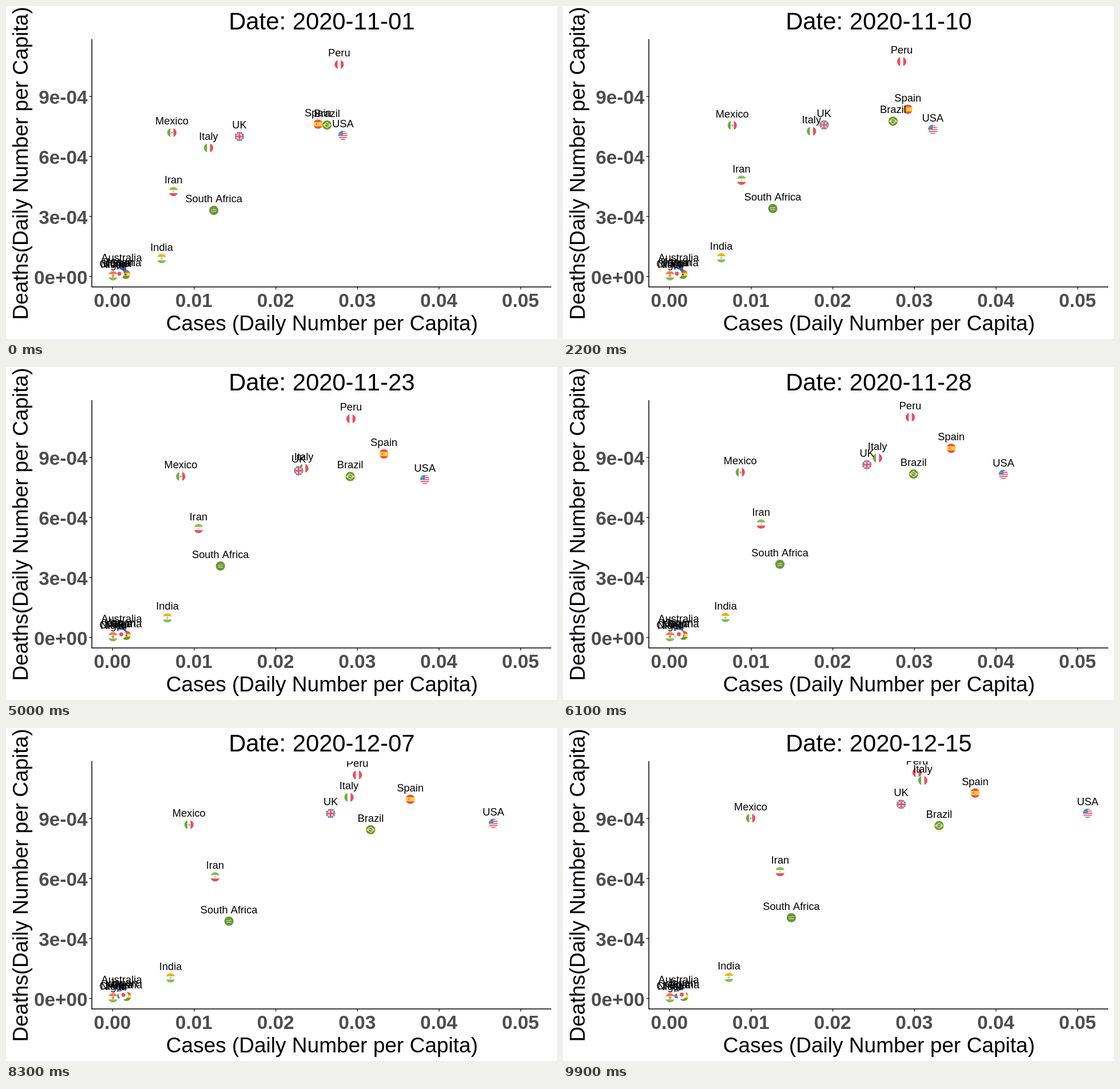
An HTML page for the animation above (10 s loop, 963 by 582 pixels).

```html
<!DOCTYPE html>
<html lang="en">
<head>
<meta charset="utf-8">
<title>Cases and deaths per capita</title>
<style>
html, body { margin: 0; width: 100%; height: 100%; overflow: hidden; background: #fff; }
svg { display: block; font-family: "Liberation Sans", Arial, sans-serif; font-kerning: none; }
text { text-anchor: middle; }
.tick { font-weight: bold; font-size: 33.3px; fill: #4d4d4d; }
.ytick { text-anchor: end; }
.axis { font-size: 37px; }
.title { font-size: 41.8px; }
.label { font-size: 18.3px; }
</style>
</head>
<body>
<svg id="stage" width="963" height="582" viewBox="0 0 963 582">
  <defs>
    <clipPath id="panel"><rect x="150" y="58" width="803" height="433"/></clipPath>
    <clipPath id="disc"><circle r="8.1"/></clipPath>
  </defs>
  <g clip-path="url(#panel)"><g id="flags"></g><g id="labels"></g></g>
  <g id="axes"></g>
  <path d="M150 58V491H953" fill="none" stroke="#000" stroke-width="1.5"/>
  <text class="axis" x="552.3" y="567">Cases (Daily Number per Capita)</text>
  <text class="axis" transform="translate(38 275) rotate(-90)">Deaths(Daily Number per Capita)</text>
  <text class="title" id="date" x="551.8" y="41"></text>
</svg>
<script>
const FRAME_MS = 100, FRAMES = 100, DAYS = 44;
const RED = '#ed4c5c', GREEN = '#699635', LIME = '#83bf4f', LEAF = '#75a843',
      BLUE = '#428bc1', NAVY = '#2a5f9e', GOLD = '#ffce31', YELLOW = '#ffe62e',
      AMBER = '#f2b200', ORANGE = '#f47c4c', WHITE = '#fff';

const byId = id => document.getElementById(id);
const rect = (x, y, w, h, fill) => `<rect x="${x}" y="${y}" width="${w}" height="${h}" fill="${fill}"/>`;
const dot = (x, y, r, fill) => `<circle cx="${x}" cy="${y}" r="${r}" fill="${fill}"/>`;
const shape = (d, fill) => `<path d="${d}" fill="${fill}"/>`;
const line = (d, color, width) => `<path d="${d}" stroke="${color}" stroke-width="${width}" fill="none"/>`;

// Flags are drawn around 0,0 and cut to a disc
const field = color => rect(-9, -9, 18, 18, color);
const across = (a, b, c, half = 2.8) => field(b) + rect(-9, -9, 18, 9 - half, a) + rect(-9, half, 18, 9 - half, c);
const upright = (a, b, c, half = 2.7) => field(b) + rect(-9, -9, 9 - half, 18, a) + rect(half, -9, 9 - half, 18, c);

function unionJack() {
  const diagonals = 'M-8-8L8 8M8-8L-8 8', cross = 'M0-9V9M-9 0H9';
  return field(NAVY) + line(diagonals, WHITE, 2.2) + line(diagonals, RED, .8)
    + line(cross, WHITE, 4.2) + line(cross, RED, 2.7);
}

function starsAndStripes() {
  let stripes = field(WHITE);
  for (let y = -8; y < 8; y += 3.5) stripes += rect(-9, y, 18, 1.75, RED);
  return stripes + rect(-9, -9, 9, 9, BLUE) + dot(-5, -3, .5, WHITE) + dot(-2.5, -3, .5, WHITE);
}

const southernCross = () => field(NAVY) + line('M-8-4H0M-4-8V0', WHITE, 1.8) + line('M-8-4H0M-4-8V0', RED, .9)
  + dot(4, -4, .8, WHITE) + dot(4, 4, .8, WHITE) + dot(-3, 4, 1.1, WHITE);

// A country glides from one point to another, drawn towards a third on the way
const midpoint = (a, b) => a.map((v, i) => (v + b[i]) / 2);
const country = (name, flag, from, to = from, via = midpoint(from, to)) => ({ name, flag, from, via, to });

const countries = [
  country('Ghana', across(RED, YELLOW, GREEN, 2.5) + shape('M0-2.8L1.7 2.4L-2.7-.8H2.7L-1.7 2.4Z', '#3e4347'), [209, 469], [211, 469]),
  country('China', field(RED) + dot(-3, -2, 1.8, YELLOW), [187, 471.4]),
  country('Australia', southernCross(), [202, 460]),
  country('Korea', field(WHITE) + dot(0, 0, 4, BLUE) + shape('M-4 0A4 4 0 0 1 4 0A2 2 0 0 1 0 0A2 2 0 0 0-4 0Z', RED), [194, 469.5], [198.5, 468.5]),
  country('Japan', field(WHITE) + dot(0, 0, 3.4, RED), [198, 468], [207.5, 466], [200, 467.5]),
  country('Niger', across(ORANGE, WHITE, LIME) + dot(0, 0, 2.2, ORANGE), [187, 471.5]),
  country('India', across(AMBER, WHITE, LIME) + dot(0, 0, 1.9, '#a8c9e0'), [272, 441.5], [290, 436], [283, 438.3]),
  country('South Africa', field(GREEN) + line('M-4.5-1.6L-2.5-.6L-1-2L.6-.8L2.5-2L4.5-1M-4 2H4', WHITE, .9), [363.2, 357.2], [399, 331.5], [368, 351.5]),
  country('Iran', across(LIME, WHITE, RED) + dot(0, 0, 1.2, '#f29aa3'), [292.7, 324.3], [379.5, 251], [336, 277.7]),
  country('Mexico', upright(LEAF, WHITE, RED) + dot(.2, 0, 1.5, '#96a07a'), [290, 221.3], [328, 157.7], [301.4, 193.5]),
  country('Peru', upright(RED, WHITE, RED), [582.3, 102.3], [618.8, 78], [605, 91]),
  country('Italy', upright(LEAF, WHITE, RED), [354, 248], [628.8, 91.7], [547, 186]),
  country('UK', unionJack(), [408, 228], [591, 133.3], [521.5, 183]),
  country('Spain', across(RED, GOLD, RED, 3.7) + rect(-4.4, -1.6, 3, 3.4, '#ee8a4c'), [545.3, 206.5], [720.3, 113.7], [686.4, 144.7]),
  country('Brazil', field(GREEN) + shape('M-7.6 0L0-5.6L7.6 0L0 5.6Z', YELLOW) + dot(0, 0, 3.2, BLUE) + line('M-3-.8Q0-1 2.8 1.3', WHITE, .9), [561, 208], [657.3, 170.5], [593, 194]),
  country('USA', starsAndStripes(), [588.8, 226.3], [917, 149], [708, 206.7])
];

function drawAxes() {
  let marks = '';
  for (let i = 0; i < 6; i++) {
    const x = 186.3 + i * 142.65;
    marks += line(`M${x} 491v4.5`, '#333', 1.5) + `<text class="tick" x="${x - .5}" y="525.5">0.0${i}</text>`;
  }
  for (let i = 0; i < 4; i++) {
    const y = 472.6 - i * 104.8, value = i ? `${i * 3}e-04` : '0e+00';
    marks += line(`M150 ${y}h-4.5`, '#333', 1.5) + `<text class="tick ytick" x="142.5" y="${y + 13}">${value}</text>`;
  }
  byId('axes').innerHTML = marks;
}

// Quadratic Bezier curve, u from 0 to 1
const glide = ({ from, via, to }, u) =>
  from.map((start, i) => (1 - u) ** 2 * start + 2 * u * (1 - u) * via[i] + u * u * to[i]);

drawAxes();
byId('flags').innerHTML = countries.map(c => `<g><g clip-path="url(#disc)">${c.flag}</g></g>`).join('');
byId('labels').innerHTML = countries.map(c => `<text class="label" y="-14">${c.name}</text>`).join('');
const flags = byId('flags').children, labels = byId('labels').children, date = byId('date');

function draw(frame) {
  const u = frame / (FRAMES - 1);
  countries.forEach((c, i) => {
    const place = `translate(${glide(c, u).join(' ')})`;
    flags[i].setAttribute('transform', place);
    labels[i].setAttribute('transform', place);
  });
  const day = new Date(Date.UTC(2020, 10, 1 + Math.floor(u * DAYS)));
  date.textContent = 'Date: ' + day.toISOString().slice(0, 10);
}

const start = performance.now();
function tick() {
  draw(Math.floor((performance.now() - start) / FRAME_MS) % FRAMES);
  requestAnimationFrame(tick);
}
tick();
</script>
</body>
</html>
```
